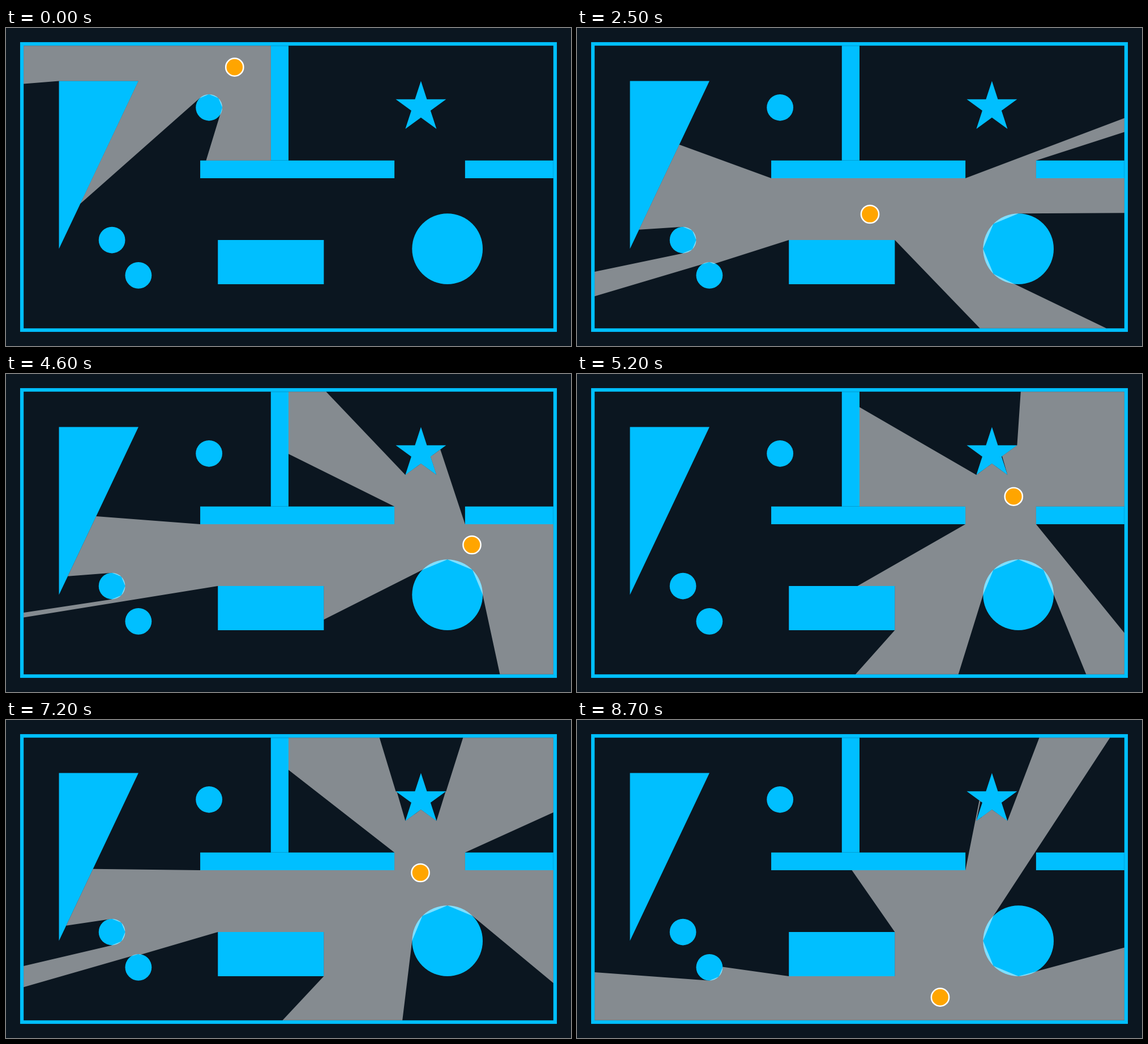
Recreate the animation shown at these times as an HTML page with a canvas. Size 998 px wide and 561 px high, loop 8800 ms.

```html
<!DOCTYPE html>
<html>
<head>
<meta charset="utf-8">
<style>
  html, body { margin: 0; overflow: hidden; background: #0b1620; }
  canvas { display: block; }
</style>
</head>
<body>
<canvas id="stage" width="998" height="561"></canvas>
<script>
const ctx = document.getElementById('stage').getContext('2d');
const SCALE = [998 / 1600, 561 / 900];
const LOOP = 8800, STEP = 100, TAU = Math.PI * 2;
const BLUE = '#00bfff';

const rect = (x, y, w, h) => [[x, y], [x + w, y], [x + w, y + h], [x, y + h]];
const ring = (x, y, n, radius, start = 0) => Array.from({ length: n }, (_, i) => {
  const a = start + i * TAU / n, r = radius(i);
  return [x + r * Math.cos(a), y + r * Math.sin(a)];
});

const room = rect(50, 50, 1500, 800);
const blocks = [
  [[150, 150], [375, 150], [150, 625]],
  rect(750, 50, 50, 325),
  rect(550, 375, 550, 50),
  rect(1300, 375, 250, 50),
  rect(600, 600, 300, 125),
  ring(1175, 225, 10, i => i % 2 ? 28.65 : 75, -TAU / 4)
];
const discs = [[575, 225, 37.5], [300, 600, 37.5], [375, 700, 37.5], [1250, 625, 100]];

// Discs cast shadows as octagons.
const shapes = [room, ...blocks, ...discs.map(([x, y, r]) => ring(x, y, 8, () => r))];
const corners = shapes.flat();
const edges = shapes.flatMap(s => s.map((p, i) => [p, s[(i + 1) % s.length]]));

// Key points of the light: time in ms, then x and y in stage pixels.
const path = [
  [600, 403.8, 69.2], [1050, 318, 105], [1500, 272, 200], [2000, 360, 310],
  [2500, 517.5, 328.5], [3300, 775, 489], [3700, 867, 497], [4200, 888, 400],
  [4600, 823, 301.5], [5100, 765, 239], [5550, 808, 120], [6000, 670.5, 42],
  [6500, 665, 170], [6900, 730, 201], [7200, 732, 269.5], [8500, 641.5, 489.2]
];

function slope(i, k) {
  const a = path[i - 1], b = path[i + 1];
  return a && b ? (b[k] - a[k]) / (b[0] - a[0]) : 0;
}

// Smooth curve through the key points, at rest at both ends.
function lightAt(time) {
  const t = Math.min(path.at(-1)[0], Math.max(path[0][0], time));
  const i = Math.max(1, path.findIndex(p => p[0] >= t));
  const a = path[i - 1], b = path[i], d = b[0] - a[0], u = (t - a[0]) / d;
  return [1, 2].map(k => {
    const m = slope(i - 1, k) * d, n = slope(i, k) * d, gap = b[k] - a[k];
    return (a[k] + u * (m + u * (3 * gap - 2 * m - n + u * (m + n - 2 * gap)))) / SCALE[k - 1];
  });
}

function castRay(x, y, angle) {
  const dx = Math.cos(angle), dy = Math.sin(angle), slack = 1e-9;
  let near = Infinity;
  for (const [[ax, ay], [bx, by]] of edges) {
    const ex = bx - ax, ey = by - ay, det = dx * ey - dy * ex;
    if (Math.abs(det) < 1e-9) continue;
    const px = ax - x, py = ay - y;
    const dist = (px * ey - py * ex) / det;
    const along = (px * dy - py * dx) / det;
    if (along >= -slack && along <= 1 + slack && dist > 0) near = Math.min(near, dist);
  }
  return [x + dx * near, y + dy * near];
}

function visibleArea(x, y) {
  return corners
    .flatMap(([cx, cy]) => {
      const a = Math.atan2(cy - y, cx - x);
      return [a - 1e-5, a, a + 1e-5];
    })
    .sort((a, b) => a - b)
    .map(a => castRay(x, y, a));
}

function fillShape(points, color) {
  ctx.beginPath();
  points.forEach(p => ctx.lineTo(...p));
  ctx.closePath();
  ctx.fillStyle = color;
  ctx.fill();
}

function fillDisc(x, y, r, color) {
  ctx.beginPath();
  ctx.arc(x, y, r, 0, TAU);
  ctx.fillStyle = color;
  ctx.fill();
}

function draw(time) {
  const [x, y] = lightAt(time);
  ctx.setTransform(SCALE[0], 0, 0, SCALE[1], 0, 0);
  ctx.fillStyle = '#0b1620';
  ctx.fillRect(0, 0, 1600, 900);
  ctx.strokeStyle = BLUE;
  ctx.lineWidth = 10;
  ctx.strokeRect(45, 45, 1510, 810);
  blocks.forEach(b => fillShape(b, BLUE));
  discs.forEach(d => fillDisc(...d, BLUE));
  fillShape(visibleArea(x, y), 'rgba(255,255,255,0.5)');
  fillDisc(x, y, 25, '#ffa500');
  ctx.strokeStyle = '#fff';
  ctx.lineWidth = 4;
  ctx.stroke();
}

let start;
function tick(now) {
  start ??= now;
  draw(Math.floor((now - start) % LOOP / STEP) * STEP);
  requestAnimationFrame(tick);
}
draw(0);
requestAnimationFrame(tick);
</script>
</body>
</html>
```
